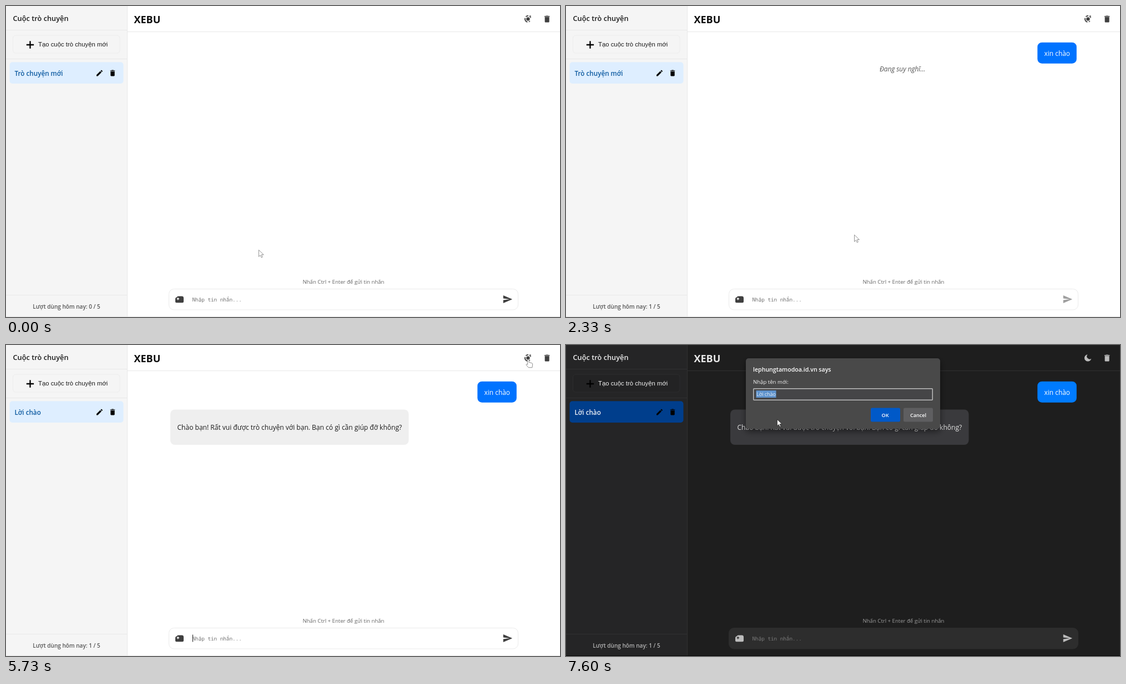
These frames come from a looping animation (998 px wide and 561 px high, 8000 ms). An HTML page:

```html
<!DOCTYPE html>
<html lang="vi">
<head>
<meta charset="utf-8">
<title>Chat</title>
<style>
  html, body { margin: 0; width: 100%; height: 100%; overflow: hidden; }
  svg {
    display: block; width: 100vw; height: 100vh;
    font-family: "Open Sans", "Noto Sans", sans-serif;
    --main: #fff; --side: #f5f5f5; --line: #e8e8e8; --title: #0c0c0c; --head: #1c1c1c;
    --btn: #f5f5f5; --btnLine: #ededed; --btnText: #1c1c1c; --use: #555; --hint: #666;
    --box: #fff; --boxLine: #ebebeb; --holder: #707070; --icon: #3f3f3f; --mine: #0073ff;
    --bot: #efefef; --botText: #1a1a1a; --edge: #e4e4e4;
  }
  svg.dark {
    --main: #1e1e1e; --side: #252526; --line: #303031; --title: #e8e8e8; --head: #ededed;
    --btn: #232324; --btnLine: #2d2d2e; --btnText: #f0f0f0; --use: #b4b4b4; --hint: #9c9c9c;
    --box: #2d2d2d; --boxLine: #2d2d2d; --holder: #7b7b7b; --icon: #bcbcbc; --mine: #007bff;
    --bot: #3a3a3d; --botText: #e4e4e4; --edge: #050505;
  }
  .semi { font-weight: 600; }
  .mono { font: 9.3px "Noto Sans Mono", "DejaVu Sans Mono", monospace; white-space: pre; }
  .line { stroke: var(--line); fill: none; }
  .icon { fill: var(--icon); }
  .mid { text-anchor: middle; }
</style>
</head>
<body>
<svg id="stage" viewBox="0 0 998 561" preserveAspectRatio="none">
  <defs>
    <path id="bin" d="M6 19c0 1.1.9 2 2 2h8c1.1 0 2-.9 2-2V7H6zM19 4h-3.5l-1-1h-5l-1 1H5v2h14z"/>
    <filter id="shadow" x="-10%" y="-20%" width="120%" height="150%">
      <feDropShadow dx="0" dy="5" stdDeviation="6" flood-color="#000" flood-opacity=".5"/>
    </filter>
  </defs>

  <rect width="998" height="561" fill="var(--main)"/>
  <rect width="218" height="561" fill="var(--side)"/>
  <path class="line" d="M0 43.5H218M0 95.5H218M0 521.5H218M218.5 0V561M218 46.5H998"/>
  <path d="M0 560.5H998" stroke="var(--edge)"/>

  <!-- sidebar -->
  <text class="semi" x="12.5" y="27" font-size="12.8" fill="var(--head)">Cuộc trò chuyện</text>
  <rect x="12.5" y="53" width="192.5" height="32" rx="5" fill="var(--btn)" stroke="var(--btnLine)"/>
  <path transform="translate(32.1 58.6) scale(.95)" d="M19 13.2h-5.8V19h-2.4v-5.8H5v-2.4h5.8V5h2.4v5.8H19z"/>
  <text x="58" y="73" font-size="11.35" fill="var(--btnText)" font-family="Liberation Sans, Arial, sans-serif">Tạo cuộc trò chuyện mới</text>
  <rect id="item" x="6.5" y="101.3" width="205" height="38.7" rx="5"/>
  <text id="name" class="semi" x="15.5" y="126" font-size="11.7"></text>
  <path transform="translate(161.2 113.7) scale(.61)" d="M3 17.25V21h3.75L17.81 9.94l-3.75-3.75zM20.71 7.04a1 1 0 0 0 0-1.41l-2.34-2.34a1 1 0 0 0-1.41 0l-1.83 1.83 3.75 3.75z"/>
  <use href="#bin" transform="translate(184.7 113.7) scale(.61)"/>
  <text id="count" class="semi mid" x="109" y="546" font-size="10.05" fill="var(--use)"></text>

  <!-- header -->
  <text x="230.5" y="31" font-size="18" font-weight="700" fill="var(--title)">XEBU</text>
  <g id="sun" class="icon">
    <circle cx="940.4" cy="23.4" r="3.2"/>
    <g fill="none" stroke="var(--icon)">
      <path d="M939.4 28.9A5.4 5.4 0 0 1 935.2 21.8" stroke-width="1.9"/>
      <path d="M936.4 19.4A5.8 5.8 0 0 1 941 17.6" stroke-width="1.6"/>
      <path d="M942.6 18.6L945.6 18.2M943.9 20.6L945.8 20.4" stroke-width="1.7"/>
      <path d="M941.8 28.6L944 27.2" stroke-width="1.3"/>
    </g>
  </g>
  <path id="moon" class="icon" d="M939.6 17.2A6.2 6.2 0 1 0 946.2 24.4A4.9 4.9 0 0 1 939.6 17.2Z"/>
  <use href="#bin" class="icon" transform="translate(966.6 15.4) scale(.67)"/>

  <!-- conversation -->
  <g id="mine">
    <rect x="849.3" y="65.7" width="70.5" height="38" rx="8" fill="var(--mine)"/>
    <text class="mid" x="884.8" y="90" font-size="11.9" fill="#fff">xin chào</text>
  </g>
  <text id="wait" x="565" y="117.5" font-size="11.8" font-style="italic" fill="#555">Đang suy nghĩ...</text>
  <g id="reply">
    <rect x="296" y="116.5" width="429.5" height="63.5" rx="8" fill="var(--bot)"/>
    <text x="308.5" y="153" font-size="12.02" fill="var(--botText)">Chào bạn! Rất vui được trò chuyện với bạn. Bạn có gì cần giúp đỡ không?</text>
  </g>

  <!-- composer -->
  <text id="hint" class="mid" x="608" font-size="9.6" fill="var(--hint)">Nhấn Ctrl + Enter để gửi tin nhắn</text>
  <rect id="box" x="293.5" width="629" rx="9" fill="var(--box)" stroke="var(--boxLine)"/>
  <g id="tools">
    <path class="icon" d="M305 528q.2-2.4 2.4-2.6q1-2 3-2h6.4q3.2 0 3.2 3.4v6.4q0 2-2 2h-11q-2 0-2-2z"/>
    <path d="M309.8 525.2l.9 2.1 2.1.9-2.1.9-.9 2.1-.9-2.1-2.1-.9 2.1-.9z" fill="var(--box)"/>
    <path id="send" class="icon" transform="translate(894.2 519.6) scale(.78)" d="M2.01 21L23 12 2.01 3 2 10l15 2-15 2z"/>
  </g>
  <text id="entry" class="mono" x="335.5"></text>
  <path id="caret" d="M336.5 522.5V535.5" stroke="#111"/>

  <!-- prompt -->
  <g id="prompt">
    <rect x="324" y="24" width="350" height="127" rx="5" fill="#48484a" filter="url(#shadow)"/>
    <text x="337" y="48" font-size="10.6" font-weight="600" fill="#fff">lephungtamodoa.id.vn says</text>
    <text x="337" y="69.5" font-size="9.6" fill="#f0f0f0">Nhập tên mới:</text>
    <rect x="337.75" y="78.75" width="322.5" height="20.5" rx="1" fill="#454547" stroke="#bdbdbd" stroke-width="1.5"/>
    <rect x="342.5" y="82" width="36" height="13" fill="#5f93cd"/>
    <text x="343" y="92.3" font-size="9" fill="#e9eff6">Lời chào</text>
    <g class="semi mid" font-size="9.1" fill="#fff">
      <rect x="549" y="113.5" width="53" height="25" rx="2.5" fill="#0059c8"/>
      <text x="575" y="129.5">OK</text>
      <rect x="608" y="113.5" width="53" height="25" rx="2.5" fill="#5e5e60"/>
      <text x="634.5" y="129.5">Cancel</text>
    </g>
  </g>

  <g id="pointer" fill="#fff" stroke-width=".9" stroke-linejoin="round">
    <path id="arrow" d="M.3 0V12.2L3.2 9.5 5.1 13.8 7.1 12.9 5.2 8.7H9.2Z"/>
    <path id="hand" d="M-1.3 1.2Q0-.6 1.2 1.2V5.8L6 7Q7.9 7.5 7.7 9.5L6.9 15.2H.2L-3.9 10.4Q-4.2 8.8-2.4 9L-1.3 9.9Z"/>
  </g>
</svg>

<script>
const LOOP = 8000;
const GROW = 930, CLEAR = 1730, SENT = 2070, NAMED = 3270, REPLY = 4300, DARK = 5800, PROMPT = 6870;
const KEYS = ["x", "xi", "xin", "xin ", "xin c", "xin ch", "xin cha", "xin chao", "xin chào"];
// time, x, y of the pointer tip
const PATH = [
  [2200, 455, 440], [2870, 890, 256], [3070, 995, 229], [4300, 995, 229], [4600, 882, 178],
  [5470, 901, 40], [5600, 941, 25.5], [5960, 941, 25.5], [6330, 305, 118], [6600, 223, 126],
  [6730, 168, 120], [6930, 168, 120], [7600, 380, 134]
];

const el = {};
document.querySelectorAll("[id]").forEach(n => el[n.id] = n);
const clamp = v => Math.max(0, Math.min(1, v));
const show = (node, on) => node.style.display = on ? "" : "none";
const write = (node, s) => { if (node.textContent !== s) node.textContent = s; };
const mix = (a, b, k) => `rgb(${a.map((v, i) => Math.round(v + (b[i] - v) * k))})`;

function pointerAt(t) {
  const i = PATH.findIndex(p => p[0] > t);
  if (i === 0) return PATH[0].slice(1);
  if (i < 0) return PATH[PATH.length - 1].slice(1);
  const [t0, x0, y0] = PATH[i - 1], [t1, x1, y1] = PATH[i];
  const k = (t - t0) / (t1 - t0), e = (k + k * k * (3 - 2 * k)) / 2;
  return [x0 + (x1 - x0) * e, y0 + (y1 - y0) * e];
}

function drawComposer(t, dark) {
  const tall = t >= GROW && t < CLEAR;
  const typed = tall ? KEYS[Math.min(8, Math.floor((t - GROW) / 75))] : "";
  el.hint.setAttribute("y", tall ? 493 : 501);
  el.box.setAttribute("y", tall ? 502.5 : 510.5);
  el.box.setAttribute("height", tall ? 45.5 : 37.5);
  el.tools.setAttribute("transform", `translate(0 ${tall ? -4 : 0})`);
  el.send.style.opacity = t >= CLEAR && t < REPLY ? 0.5 : 1;
  write(el.entry, typed || "Nhập tin nhắn...");
  el.entry.setAttribute("y", tall ? 521.3 : 532.5);
  el.entry.style.fill = tall ? "#111" : "var(--holder)";
  show(el.caret, t >= REPLY && !dark && Math.floor((t - REPLY) / 530) % 2 === 0);
}

function drawPointer(t, dark) {
  const [x, y] = pointerAt(t);
  const hand = (t >= 5560 && t < 6000) || (t >= 6700 && t < 6940);
  el.pointer.setAttribute("transform", `translate(${x} ${y})`);
  el.pointer.setAttribute("stroke", dark ? "#222" : "#858585");
  show(el.hand, hand);
  show(el.arrow, !hand);
}

function draw(t) {
  const dark = t >= DARK;
  el.stage.classList.toggle("dark", dark);
  show(el.sun, !dark);
  show(el.moon, dark);

  const k = dark ? clamp(0.46 + (t - DARK) / 350) : 0;
  el.item.style.fill = mix([222, 238, 255], [0, 62, 140], k);
  el.name.style.fill = mix([13, 90, 160], [240, 243, 248], k * k);
  write(el.name, t < NAMED ? "Trò chuyện mới" : "Lời chào");
  write(el.count, `Lượt dùng hôm nay: ${t < SENT ? 0 : 1} / 5`);

  show(el.mine, t >= SENT);
  show(el.wait, t >= SENT && t < REPLY);
  show(el.reply, t >= REPLY);
  drawComposer(t, dark);

  show(el.prompt, t >= PROMPT);
  el.prompt.style.opacity = clamp(0.3 + (t - PROMPT) / 180);
  drawPointer(t, dark);
}

const start = performance.now();
function tick() {
  draw((performance.now() - start) % LOOP);
  requestAnimationFrame(tick);
}
tick();
</script>
</body>
</html>
```
